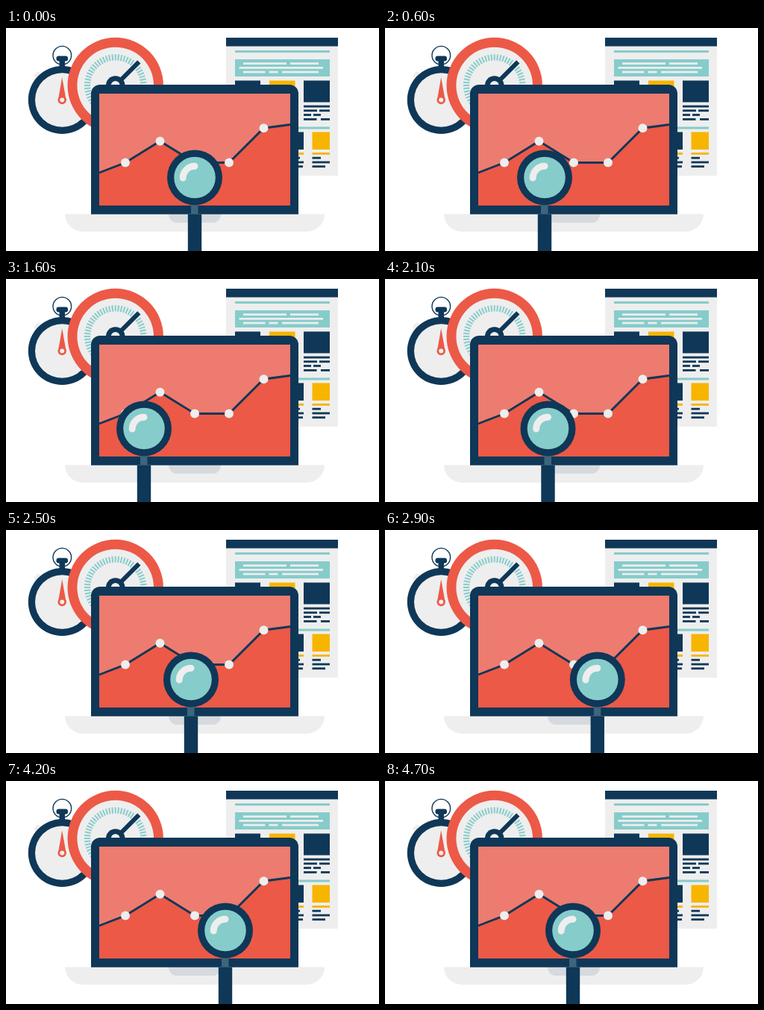
Animation of 500 by 299 pixels, one loop 4.8 s. Source, as an HTML page:

```html
<!DOCTYPE html>
<html lang="en">
<head>
<meta charset="utf-8">
<title>Analytics search</title>
<style>
  html, body { margin: 0; width: 100%; height: 100%; overflow: hidden; background: #fff; }
  svg { display: block; width: 500px; height: 299px; }
  .navy { fill: #0f3757; }
  .red { fill: #ec5947; }
  .pale { fill: #eee; }
  .teal { fill: #86cccb; }
  .gold { fill: #f7b500; }
  .ink { fill: none; stroke: #0f3757; }
</style>
</head>
<body>
<svg viewBox="0 0 500 299">
  <g id="stopwatch">
    <circle class="ink" cx="75.3" cy="36.7" r="12.3" stroke-width="1.4"/>
    <rect class="navy" x="67.5" y="37.5" width="15.5" height="7" rx="3"/>
    <rect class="navy" x="71.5" y="43" width="7.5" height="10"/>
    <g transform="translate(42 63) rotate(-45)">
      <rect class="navy" x="-2" y="0" width="4" height="6"/>
      <rect class="pale" x="-4.5" y="-3" width="9" height="5.5" rx="1.5"/>
    </g>
    <circle class="navy" cx="75.3" cy="96.5" r="45.5"/>
    <circle class="pale" cx="75.3" cy="96.5" r="36.3"/>
    <path class="red" d="M75.2 66 L80.5 96 H70Z"/>
    <circle class="red" cx="75.2" cy="96.5" r="5.7"/>
    <circle class="pale" cx="75.2" cy="96.5" r="3"/>
  </g>

  <g id="gauge">
    <circle class="red" cx="146.7" cy="77" r="64.2"/>
    <circle class="pale" cx="146.7" cy="77" r="51.3"/>
    <g id="ticks" stroke="#86cccb" stroke-width="2"></g>
    <path class="ink" d="M146.7 77 L178.3 45.4" stroke-width="6"/>
    <circle class="navy" cx="146.7" cy="77" r="12.8"/>
    <circle class="pale" cx="146.7" cy="77" r="6"/>
  </g>

  <g id="page">
    <rect class="pale" x="295" y="13" width="150" height="185"/>
    <rect class="navy" x="295" y="13" width="150" height="11.5"/>
  </g>

  <g id="laptop">
    <path class="pale" d="M79 249.5 H427 A24 23.5 0 0 1 403 273 H103 A24 23.5 0 0 1 79 249.5Z"/>
    <path fill="#d6dade" d="M218 249.5 H288 A11 11.5 0 0 1 277 261 H229 A11 11.5 0 0 1 218 249.5Z"/>
    <path class="navy" d="M114 249.7 V88 A12 12 0 0 1 126 76 H380 A12 12 0 0 1 392 88 V249.7Z"/>
    <rect x="125" y="88" width="256" height="150" fill="#ed7b70"/>
    <path id="area" class="red"/>
    <path id="trend" class="ink" stroke-width="2.9"/>
    <g id="dots" class="pale"></g>
  </g>

  <g id="lens">
    <rect x="-5" y="236" width="9.5" height="14" fill="#3d667e"/>
    <rect class="navy" x="-9.2" y="249.7" width="18.4" height="50"/>
    <circle class="navy" cy="200.5" r="37"/>
    <circle class="teal" cy="200.5" r="27.8"/>
    <path d="M-15.8 201 A15.8 15.8 0 0 1 0 185.2" fill="none" stroke="#eee" stroke-width="9" stroke-linecap="round"/>
  </g>
</svg>
<script>
  const $ = id => document.getElementById(id);
  const add = (parent, tag, attrs) => {
    const el = document.createElementNS('http://www.w3.org/2000/svg', tag);
    for (const k in attrs) el.setAttribute(k, attrs[k]);
    parent.append(el);
  };

  // Gauge scale
  for (let a = -126; a <= 126; a += 6)
    add($('ticks'), 'path', { d: 'M146.7 35.2 v8.2', transform: `rotate(${a} 146.7 77)` });

  // Page blocks: class, y, height, then [left, right] spans
  const blocks = [
    ['teal', 30, 3, [307, 434]],
    ['teal', 42, 23, [307, 434]],
    ['pale', 46.3, 2.7, [318, 376], [381, 419]],
    ['pale', 52, 2.7, [312.5, 425]],
    ['pale', 57.7, 2.7, [318, 347.5], [352.5, 364.5], [370, 419]],
    ['navy', 70.5, 29, [307, 341], [399, 434]],
    ['gold', 70.5, 29, [353, 387.5]],
    ['navy', 103.7, 2.8, [399, 434]],
    ['navy', 109.4, 2.8, [399, 417], [420, 434]],
    ['navy', 115.1, 2.8, [399, 409], [412, 422]],
    ['navy', 121, 2.8, [399, 416.5], [422, 434]],
    ['teal', 132.5, 3, [307, 434]],
    ['navy', 139.5, 23.5, [375, 399]],
    ['gold', 139.5, 23.5, [410.5, 434]],
    ['gold', 167, 2.8, [375, 399], [410.5, 434]],
    ['navy', 172.8, 2.8, [375, 394], [410.5, 422]],
    ['navy', 178.6, 2.8, [375, 399], [410.5, 434]],
    ['navy', 184.3, 2.8, [375, 398], [410.5, 428]]
  ];
  for (const [cls, y, height, ...spans] of blocks)
    for (const [x, end] of spans)
      add($('page'), 'rect', { class: cls, x, y, width: end - x, height });

  // Chart
  const points = [[125, 194], [160, 180.5], [206.5, 151.7], [253, 180.5], [299, 180.5], [345.5, 134.2], [381, 129.5]];
  const line = 'M' + points.join('L');
  $('trend').setAttribute('d', line);
  $('area').setAttribute('d', line + 'V238H125Z');
  for (const [cx, cy] of points.slice(1, -1)) add($('dots'), 'circle', { cx, cy, r: 6 });

  // Lens path: [time in ms, centre x], shown in 100 ms steps
  const LOOP = 4800, STEP = 100;
  const path = [[0, 253], [600, 214], [1200, 164], [1300, 162], [1600, 185], [1800, 197], [2400, 240],
    [2500, 248], [3000, 294], [3400, 325], [3600, 343], [4200, 294], [4700, 252], [4800, 253]];

  function lensX(t) {
    const i = path.findIndex(p => p[0] > t);
    const [t0, x0] = path[i - 1], [t1, x1] = path[i];
    return x0 + (x1 - x0) * (t - t0) / (t1 - t0);
  }

  const start = performance.now();
  function draw() {
    const t = (performance.now() - start) % LOOP;
    const x = lensX(Math.floor(t / STEP) * STEP);
    $('lens').setAttribute('transform', `translate(${x.toFixed(2)} 0)`);
    requestAnimationFrame(draw);
  }
  draw();
</script>
</body>
</html>
```
